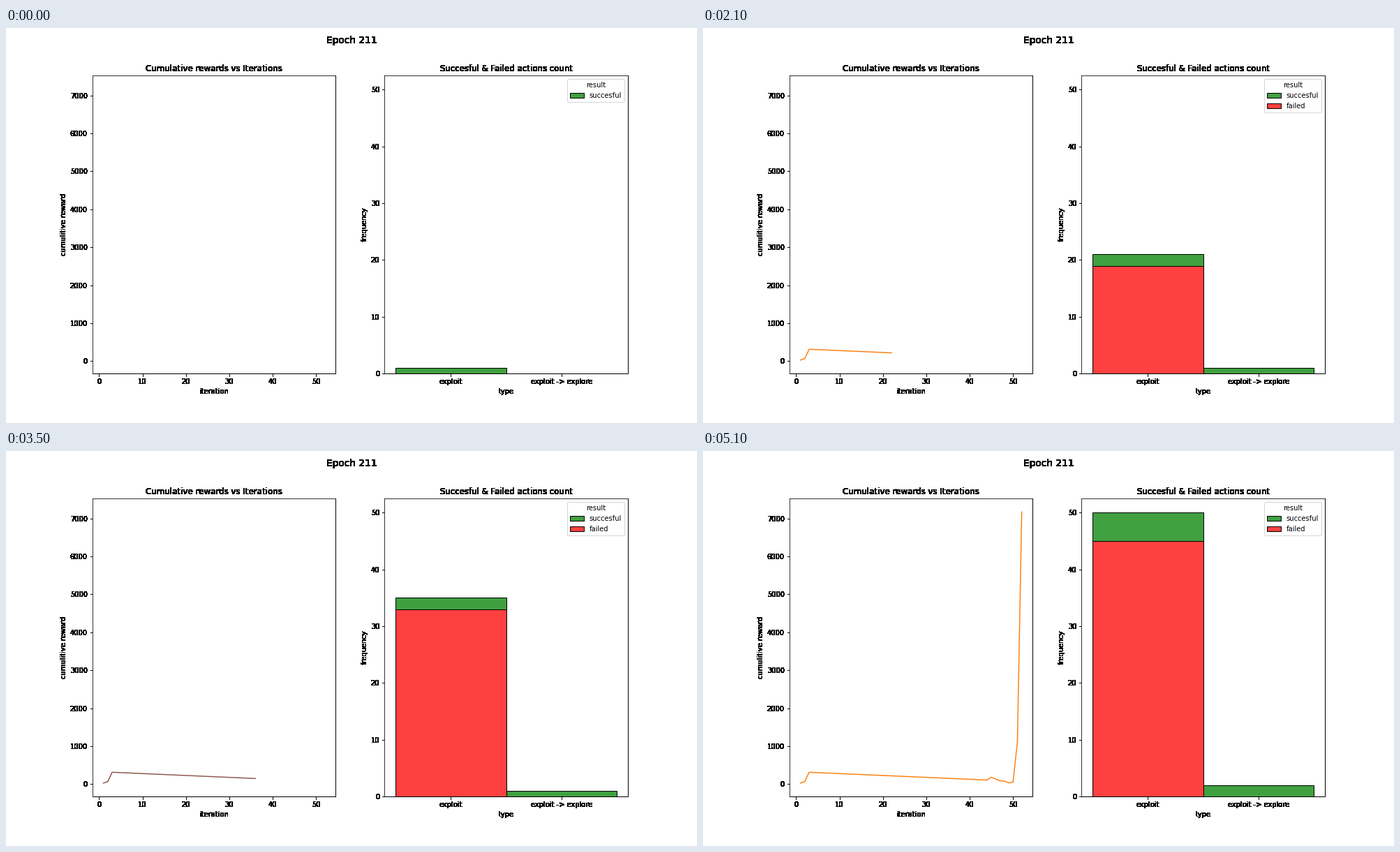
A matplotlib script that plays this animation: 990x566 px, repeating every 5200 ms.

```python
import numpy as np
import matplotlib.pyplot as plt
from matplotlib.animation import FuncAnimation
from matplotlib.patches import Patch, Rectangle

WIDTH, HEIGHT, DPI = 990, 566, 72
STEPS = 52
SCALE = WIDTH / 1008  # text is sized for a 14 inch wide figure

plt.rcParams.update({
    "font.family": "DejaVu Sans",
    "font.size": 10 * SCALE,
    "axes.titlepad": 6 * SCALE,
    "axes.labelpad": 4 * SCALE,
    "figure.subplot.bottom": 0.125,
})

# Cumulative reward: a quick start, a long slow loss, a late jump.
iteration = np.arange(1, STEPS + 1)
reward = np.concatenate([
    [30, 70],
    315 - 5 * np.arange(42),
    [185, 135, 90, 82, 35, 55, 1115, 7170],
])

# Outcome of every step.
explore = np.isin(iteration, [2, 45])
success = np.isin(iteration, [1, 2, 3, 45, 50, 51, 52])

fig = plt.figure(figsize=(WIDTH / DPI, HEIGHT / DPI), dpi=DPI)


def add_axes():
    left, right = fig.subplots(1, 2)
    left.set(xlim=(-1.55, 54.55), ylim=(-327, 7527))
    right.set(xlim=(-0.6, 1.6), ylim=(0, 52.5))
    return left, right


def hard_labels():
    """Render titles, labels and frames without soft edges, as an RGB image."""
    left, right = add_axes()
    fig.suptitle("Epoch 211", fontsize=14 * SCALE)
    left.set(title="Cumulative rewards vs Iterations",
             xlabel="iteration", ylabel="cumulitive reward",
             xticks=range(0, 51, 10), yticks=range(0, 7001, 1000))
    right.set(title="Succesful & Failed actions count",
              xlabel="type", ylabel="frequency", yticks=range(0, 51, 10))
    right.set_xticks([0, 1], ["exploit", "exploit -> explore"])
    # Dropping alpha turns every touched pixel fully black.
    fig.patch.set_alpha(0)
    fig.canvas.draw()
    image = np.array(fig.canvas.buffer_rgba())[..., :3]
    fig.clear()
    fig.patch.set_alpha(1)
    return image


# The labels lie below the axes, so that the data stays visible.
fig.figimage(hard_labels(), origin="upper", zorder=-1)
left, right = add_axes()
left.axis("off")
right.axis("off")

line, = left.plot([], [], lw=1.5 * SCALE)


def style(color):
    return dict(facecolor=(*color, 0.75), edgecolor="black", linewidth=1)


GREEN = style((0, 128 / 255, 0))
RED = style((1, 0, 0))


def add_bar(x, look):
    return right.add_patch(Rectangle((x - 0.5, 0), 1, 0, **look))


bars = [(add_bar(x, GREEN), add_bar(x, RED)) for x in (0, 1)]
good_key = Patch(label="succesful", **GREEN)
bad_key = Patch(label="failed", **RED)


def set_bar(bar, base, height):
    bar.set_y(base)
    bar.set_height(height)
    bar.set_visible(height > 0)


def update(i):
    n = i + 1
    line.set_data(iteration[:n], reward[:n])
    line.set_color(f"C{i % 10}")

    for kind, (good_bar, bad_bar) in enumerate(bars):
        chosen = explore[:n] == bool(kind)
        good = int(np.sum(chosen & success[:n]))
        bad = int(np.sum(chosen & ~success[:n]))
        set_bar(bad_bar, 0, bad)
        set_bar(good_bar, bad, good)

    keys = [good_key] if success[:n].all() else [good_key, bad_key]
    right.legend(handles=keys, title="result", loc="upper right")
    return []


anim = FuncAnimation(fig, update, frames=STEPS, interval=100,
                     repeat=True, repeat_delay=0, blit=False)
plt.show()
```
